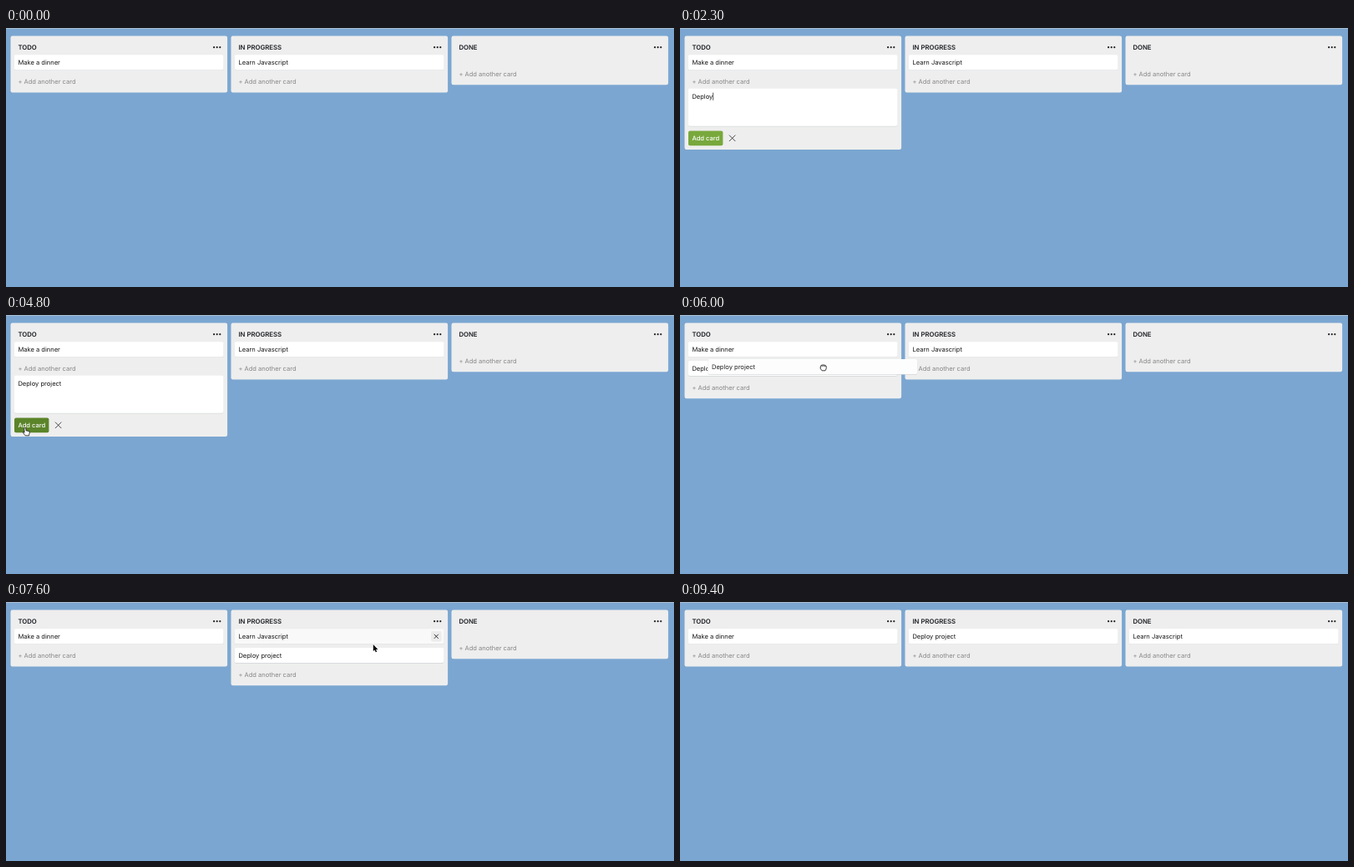
Recreate the animation shown at these times as an HTML page with a canvas. Size 800 by 311 pixels, loop 9980 ms.

```html
<!DOCTYPE html>
<html lang="en">
<head>
<meta charset="utf-8">
<title>Task board</title>
<style>
  html, body { margin: 0; width: 100%; height: 100%; overflow: hidden; background: #7ba6d1; }
  canvas { display: block; width: 800px; height: 311px; }
</style>
</head>
<body>
<canvas id="stage"></canvas>
<script>
const LOOP = 9980, STEP = 100;
const canvas = document.getElementById('stage');
const ctx = canvas.getContext('2d');
const ratio = window.devicePixelRatio || 1;
canvas.width = 800 * ratio;
canvas.height = 311 * ratio;

const DINNER = 'Make a dinner', LEARN = 'Learn Javascript', DEPLOY = 'Deploy project';
const FONT = 'px Inter, "Open Sans", sans-serif';
const CARD_W = 250.7, CARD_H = 18.2, CARD_GAP = 22.7;

// Moment at which each letter of the new card is typed
const KEYS = [1400, 1600, 1900, 2000, 2100, 2300, 2400, 2600, 2800, 2900, 3200, 3300, 3500, 3700];

// Pointer track: time, x, y, shape
const TRACK = [
  [0, 0, 0, ''],
  [100, 120, 145, 'arrow'], [600, 50, 64, 'hand'], [900, 52, 66, 'hand'],
  [1000, 74, 84, 'beam'], [1100, 75, 84, 'beam'], [1400, 75, 84, 'beam'], [1500, 75, 84, ''],
  [4300, 62, 98, 'beam'], [4600, 45, 122, 'arrow'], [4700, 26, 134, 'hand'],
  [4800, 22.8, 135.3, 'hand'], [5100, 22.8, 135.3, 'arrow'], [5200, 22.8, 135.3, 'arrow'],
  [5700, 148, 65, 'arrow'], [5800, 148, 65, 'grab'], [6000, 171.6, 63, 'grab'],
  [6200, 228, 56, 'grab'], [6400, 310, 55, 'grab'], [6500, 331, 54, 'arrow'],
  [6600, 331, 54, 'arrow'], [6700, 371, 52, 'arrow'], [6800, 331, 53, 'arrow'],
  [6900, 331, 53, 'arrow'], [7000, 345, 50, 'arrow'], [7300, 448, 48, 'arrow'],
  [7500, 448, 48, 'arrow'], [7600, 439.8, 51, 'arrow'], [7700, 426.5, 43.5, 'arrow'],
  [7800, 426.5, 43.5, 'grab'], [8000, 500, 52, 'grab'], [8200, 585, 54, 'grab'],
  [8500, 682, 42, 'grab'], [8600, 692, 43, 'grab'], [8700, 692, 43, 'arrow'],
  [9300, 740, 160, 'arrow'], [9400, 740, 160, '']
];

const SHAPES = {
  arrow: new Path2D('M0 0V8L1.8 6.4L3 9.2L4.4 8.6L3.2 5.9H5.6Z'),
  hand: new Path2D('M-1 1Q-1 0 0 0Q.9 0 1 1L1.3 3.6L4 4Q5.6 4.3 5.5 6L4.8 8.4V9.5H.3L-2.3 6.2Q-2.9 5 -1.8 5L-.7 6Z'),
  beam: new Path2D('M-1.8 -5Q0 -5 0 -4Q0 -5 1.8 -5M0 -4V4M-1.8 5Q0 5 0 4Q0 5 1.8 5'),
  grab: new Path2D('M-3.2 -1.4Q-3 -3 -1.6 -2.7Q-.6 -3.7 .5 -2.8Q1.7 -3.4 2.4 -2.3Q3.8 -2.2 3.7 -.5Q3.8 2 2.4 3.8H-1.6L-3.6 1Q-4 0 -3 0ZM-1.5 -2.6V-1M.5 -2.7V-1M2.3 -2.2V-.8')
};

const between = (t, a, b) => t >= a && t < b;
const columnX = i => 5.5 + 264 * i;
const cardY = row => 32.2 + CARD_GAP * row;

function box(x, y, w, h, r, fill) {
  ctx.fillStyle = fill;
  ctx.beginPath();
  ctx.roundRect(x, y, w, h, r);
  ctx.fill();
}

function text(str, x, y, fill = '#161616', weight = 400, size = 7.55) {
  ctx.font = weight + ' ' + size + FONT;
  ctx.fillStyle = fill;
  ctx.fillText(str, x, y);
}

function cross(x, y, r, width) {
  ctx.strokeStyle = '#222';
  ctx.lineWidth = width;
  ctx.beginPath();
  ctx.moveTo(x - r, y - r);
  ctx.lineTo(x + r, y + r);
  ctx.moveTo(x + r, y - r);
  ctx.lineTo(x - r, y + r);
  ctx.stroke();
}

function card(label, x, y, hover) {
  box(x, y + 0.7, CARD_W, CARD_H, 2, '#d3d5d8');
  box(x, y, CARD_W, CARD_H, 2, hover ? '#f9f9f9' : '#fff');
  text(label, x + 4.6, y + 12.1);
  if (hover) {
    box(x + 235.2, y + 2.8, 12.6, 12.6, 2, '#ececec');
    cross(x + 241.5, y + 9.1, 2.5, 0.9);
  }
}

function column(i, title, cards, open, hoverRow) {
  const x = columnX(i);
  const bottom = cards.length ? 77.5 + CARD_GAP * (cards.length - 1) : 68.3;
  box(x, 9.6, 259.6, (open ? 146 : bottom) - 9.6, 2.2, '#eee');
  text(title, x + 8.9, 26, '#1d1f24', 600, 7.75);
  ctx.fillStyle = '#222';
  for (const dx of [-3.6, 0, 3.6]) {
    ctx.beginPath();
    ctx.arc(x + 247.2 + dx, 23.2, 1.1, 0, 7);
    ctx.fill();
  }
  cards.forEach((label, row) => card(label, x + 4.3, cardY(row), row === hoverRow));
  text('+ Add another card', x + 8.9, bottom - 10.7, '#868686');
}

function form(t) {
  box(9.8, 73.4, CARD_W, 45, 2, '#d9dadc');
  box(9.8, 72.8, CARD_W, 45, 2, '#fff');
  const typed = DEPLOY.slice(0, KEYS.filter(k => k <= t).length);
  if (typed) text(typed, 14.4, 85);
  else text('Enter a title for this card...', 14.4, 85, '#858585');
  if (t < 4000 || between(t, 4500, 4800)) {
    ctx.fillStyle = '#111';
    ctx.fillRect(14.5 + ctx.measureText(typed).width, 77.6, 0.7, 9.2);
  }
  box(10, 123.4, 41.4, 17.8, 2, between(t, 4700, 5100) ? '#5b8429' : '#78a83c');
  text('Add card', 14.4, 135.1, '#fff', 500);
  cross(62.6, 132.3, 3.7, 0.8);
}

function pointerAt(t) {
  const i = TRACK.findLastIndex(k => k[0] <= t);
  const [t0, x0, y0, shape] = TRACK[i];
  const [t1, x1, y1] = TRACK[i + 1] || TRACK[i];
  const p = t1 > t0 ? (t - t0) / (t1 - t0) : 0;
  return { x: x0 + (x1 - x0) * p, y: y0 + (y1 - y0) * p, shape };
}

function drawPointer({ x, y, shape }) {
  if (!shape) return;
  const path = SHAPES[shape];
  ctx.save();
  ctx.translate(x, y);
  ctx.lineJoin = 'round';
  ctx.lineWidth = shape === 'arrow' ? 1.2 : 0.8;
  ctx.strokeStyle = shape === 'arrow' ? '#fff' : '#111';
  ctx.fillStyle = shape === 'arrow' ? '#000' : '#fff';
  if (shape === 'arrow') {
    ctx.stroke(path);
    ctx.fill(path);
  } else {
    if (shape !== 'beam') ctx.fill(path);
    ctx.stroke(path);
  }
  ctx.restore();
}

function ghost(label, col, row, pointer, grabX, grabY) {
  ctx.globalAlpha = 0.95;
  card(label, columnX(col) + 4.3 + pointer.x - grabX, cardY(row) + pointer.y - grabY);
  ctx.globalAlpha = 1;
}

function draw(t) {
  ctx.setTransform(ratio, 0, 0, ratio, 0, 0);
  ctx.textRendering = 'geometricPrecision';
  ctx.fillStyle = '#7ba6d1';
  ctx.fillRect(0, 0, 800, 311);
  ctx.fillStyle = '#a9bfd3';
  ctx.fillRect(0, 0, 800, 1);

  const open = between(t, 800, 5100);
  const todo = between(t, 5100, 6500) ? [DINNER, DEPLOY] : [DINNER];
  const progress = t < 6500 ? [LEARN] : t < 8700 ? [LEARN, DEPLOY] : [DEPLOY];
  const done = t < 8700 ? [] : [LEARN];
  column(0, 'TODO', todo, open, between(t, 5600, 5800) ? 1 : -1);
  column(1, 'IN PROGRESS', progress, false, between(t, 7100, 7800) ? 0 : -1);
  column(2, 'DONE', done, false, between(t, 8700, 8800) ? 0 : -1);
  if (open) form(t);

  const pointer = pointerAt(t);
  if (between(t, 5800, 6500)) ghost(DEPLOY, 0, 1, pointer, 148, 65);
  if (between(t, 7800, 8700)) ghost(LEARN, 1, 0, pointer, 426.5, 43.5);
  drawPointer(pointer);
}

const start = performance.now();
function tick() {
  const t = (performance.now() - start) % LOOP;
  draw(Math.floor(t / STEP) * STEP);
  requestAnimationFrame(tick);
}
tick();
</script>
</body>
</html>
```
